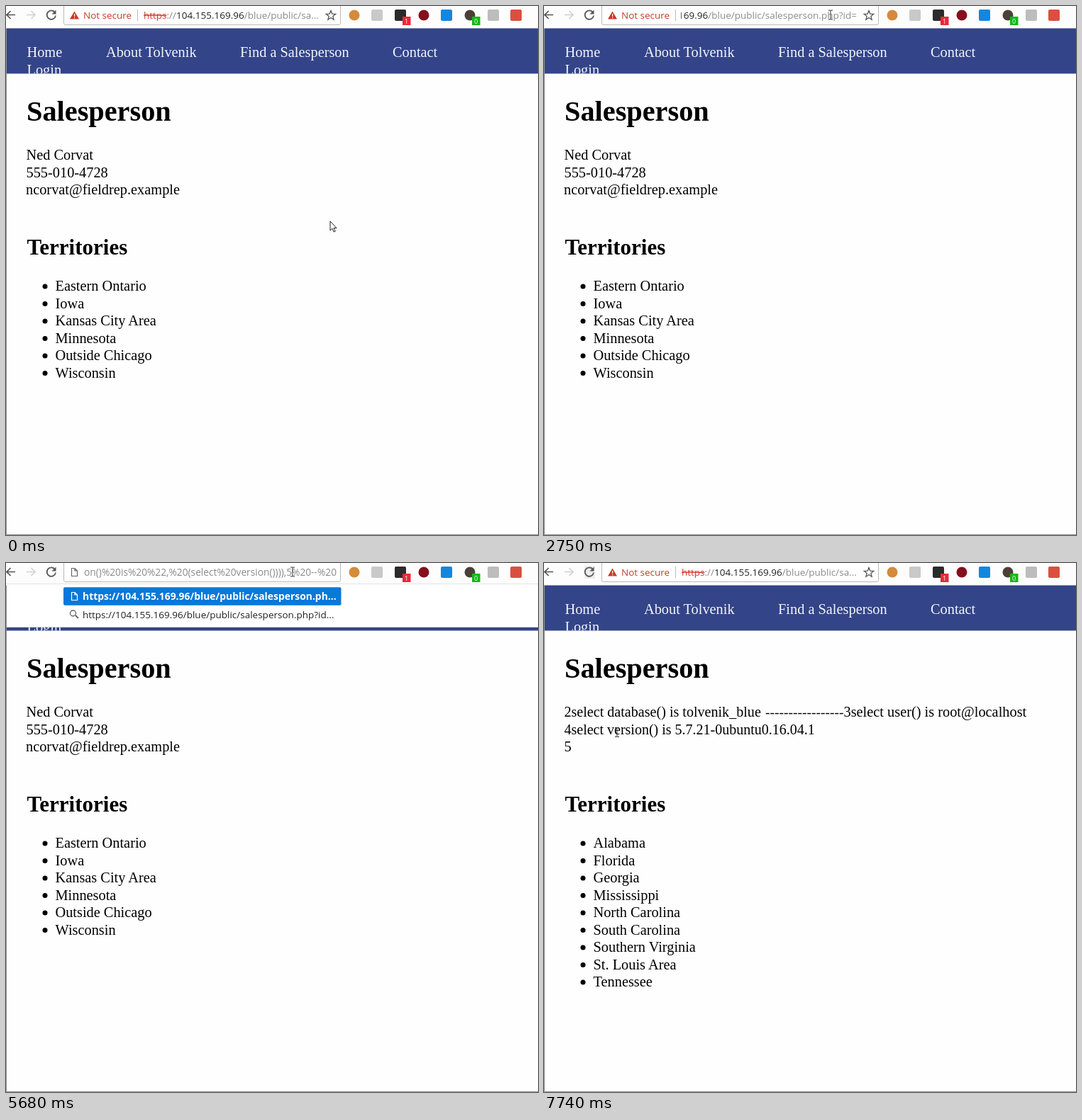
An HTML page that plays this animation: 750 px wide and 747 px high, repeating every 7.99 s.

```html
<!DOCTYPE html>
<html lang="en">
<head>
<meta charset="utf-8">
<title>Salesperson</title>
<style>
  html, body { margin: 0; width: 100%; height: 100%; overflow: hidden; background: #fff; }
  svg { display: block; width: 100vw; height: 100vh; }
  .page { font: 20.35px "Liberation Serif", serif; }
  .ui { font: 13.5px "Open Sans", "Noto Sans", sans-serif; }
  .bold { font-weight: bold; }
</style>
</head>
<body>
<svg id="stage" viewBox="0 0 750 747" xmlns="http://www.w3.org/2000/svg">
  <defs>
    <clipPath id="chipClip"><rect x="193" y="0" width="249" height="28"/></clipPath>
    <clipPath id="wideClip"><rect x="108" y="0" width="360" height="28"/></clipPath>
    <clipPath id="navClip"><rect x="0" y="31" width="750" height="64.5"/></clipPath>
  </defs>
  <g id="page" class="page"></g>
  <g id="bar" class="ui"></g>
  <g id="popup" class="ui"></g>
  <g id="cursor"></g>
</svg>
<script>
const LOOP = 7990;
const HOST = '104.155.169.96', DIR = '/blue/public/';
const SCRIPT = DIR + 'salesperson.php?id=';
const INJECTED = 'on()%20is%20%22,%20(select%20version()))),5%20--%20';

const layers = {};
function put(id, markup) {
  if (layers[id] === markup) return;
  layers[id] = markup;
  document.getElementById(id).innerHTML = markup;
}

const text = (x, y, s, attrs = '') => `<text x="${x}" y="${y}" ${attrs}>${s}</text>`;
const rect = (x, y, w, h, fill, attrs = '') =>
  `<rect x="${x}" y="${y}" width="${w}" height="${h}" fill="${fill}" ${attrs}/>`;
const line = (d, stroke, width = 1) =>
  `<path d="${d}" fill="none" stroke="${stroke}" stroke-width="${width}"/>`;
const span = (s, fill, attrs = '') => `<tspan fill="${fill}" ${attrs}>${s}</tspan>`;

// Last entry whose start time has passed
const latest = (steps, t) => steps.filter(s => s[0] <= t).pop();

/* Web page */

const people = {
  before: {
    lines: [[28.5, 217, 'Ned Corvat'], [28.5, 241.5, '555-010-4728'], [28, 266, 'ncorvat@fieldrep.example']],
    areas: ['Eastern Ontario', 'Iowa', 'Kansas City Area', 'Minnesota', 'Outside Chicago', 'Wisconsin']
  },
  after: {
    lines: [
      [28.5, 217, '2select database() is tolvenik_blue', 'font-size="20.1"'],
      [312, 217, '-'.repeat(17), 'font-size="19.5"'],
      [422.5, 217, '3select user() is root@localhost'],
      [28.5, 241.5, '4select version() is 5.7.21-0ubuntu0.16.04.1', 'font-size="20"'],
      [28.5, 266, '5']
    ],
    areas: ['Alabama', 'Florida', 'Georgia', 'Mississippi', 'North Carolina', 'South Carolina',
      'Southern Virginia', 'St. Louis Area', 'Tennessee']
  }
};

function drawPage(t) {
  const { lines, areas } = t < 7050 ? people.before : people.after;
  const nav = [[29.5, 72, 'Home'], [141, 72, 'About Tolvenik'], [330, 72, 'Find a Salesperson'],
    [545, 72, 'Contact'], [29.5, 96.5, 'Login']];
  put('page',
    rect(0, 0, 750, 747, '#fefefe') +
    rect(0, 31, 750, 64.5, '#334488') +
    `<g fill="#f3f4fa" clip-path="url(#navClip)">${nav.map(n => text(...n)).join('')}</g>` +
    text(29, 161.5, 'Salesperson', 'class="bold" font-size="40.3"') +
    lines.map(l => text(...l)).join('') +
    text(29.5, 350.5, 'Territories', 'class="bold" font-size="31"') +
    areas.map((a, i) => {
      const y = 402 + i * 24.5;
      return `<circle cx="55" cy="${y - 6}" r="3.5"/>` + text(69.5, y, a);
    }).join('') +
    line('M.5 31V746.5H750', '#8f8f8f'));
}

/* Browser toolbar */

const docIcon = (y, color) =>
  line(`M92.5 ${y - 5.5}h4.5l3.5 3.5v7.5h-8zM97 ${y - 5.5}v3.5h3.5`, color, 1.2);
const searchIcon = y => line(`M98 ${y + 1.5}l4 4`, '#666', 1.8) +
  `<circle cx="94.5" cy="${y - 1.5}" r="4" fill="none" stroke="#666" stroke-width="1.4"/>`;
const badge = (x, s, color) => rect(x, 15, 11.5, 12, color) +
  text(x + 5.7, 24.5, s, 'font-size="9" fill="#fff" text-anchor="middle"');

function star(cx, cy) {
  const pts = Array.from({ length: 10 }, (_, i) => {
    const r = i % 2 ? 3 : 7, a = i * Math.PI / 5;
    return (cx + r * Math.sin(a)).toFixed(1) + ',' + (cy - r * Math.cos(a)).toFixed(1);
  });
  return `<polygon points="${pts.join(' ')}" fill="none" stroke="#555" stroke-width="1.3"/>`;
}

function buttons(t) {
  const loading = t >= 5950 && t < 7050;
  return line('M13 12.5H1M6.5 7L1 12.5L6.5 18', '#555', 1.7) +
    line('M29 12.5H41M35.5 7L41 12.5L35.5 18', '#d2d2d2', 1.7) +
    (t >= 7200 ? rect(57, 4, 15, 18, '#ededed') : '') +
    (loading
      ? line('M58.5 7L69.5 18M69.5 7L58.5 18', '#555', 1.8)
      : line('M69 9.2A6.2 6.2 0 1 0 70 13.5', '#555', 1.8) +
        '<path d="M70.5 5.5v6h-6z" fill="#555"/>');
}

function extensions(t) {
  const tile = (cx, fill) => rect(cx - 8, 5, 16, 16, fill, 'rx="2"');
  const dot = (cx, fill) => `<circle cx="${cx}" cy="13" r="7.5" fill="${fill}"/>`;
  const badges = t >= 6260 && t < 6400 ? '' : badge(559, '1', '#e8283a') + badge(657, '0', '#12b812');
  return dot(491, '#d58a3c') + tile(523, '#c9c9c9') + tile(556, '#2b2b2b') + dot(589, '#850f1c') +
    tile(621, '#1287e0') + dot(654, '#4a4038') + tile(687, '#bdbdbd') + tile(719, '#d9503f') + badges;
}

function securityChip(opacity = 1) {
  return `<g opacity="${opacity}" fill="#c53929">` +
    '<path d="M96.5 7.5L103 18.5H90z"/>' +
    rect(96, 11, 1.2, 4, '#fff') + rect(96, 16, 1.2, 1.3, '#fff') +
    text(109, 18, 'Not secure') + rect(185, 5, 1, 16, '#bbb') + '</g>';
}

function url(x, path, { scheme = '#999', strike = false, plain = '', attrs = '' } = {}) {
  return text(x, 18,
    span('https', plain || scheme, strike ? 'text-decoration="line-through"' : '') +
    span('://', plain || '#888') + span(HOST, plain || '#222') + span(path, plain || '#8a8a8a'), attrs);
}
const clipped = (id, s) => `<g clip-path="url(#${id})">${s}</g>`;
const caret = x => rect(x, 3, 1, 19, '#333');

function address(t) {
  const red = { scheme: '#d0402f', strike: true };
  if (t < 1240) return securityChip() + url(194, DIR + 'sa...', red);
  if (t < 1360) {
    return securityChip() + rect(194, 3, 247.5, 19, '#0078d7') +
      clipped('chipClip', url(194, DIR + 'sale', { plain: '#fff', strike: true }));
  }
  if (t < 1820) {
    return securityChip() + url(194, DIR + 'sale', red) + (t >= 1670 ? caret(417) : '');
  }
  if (t < 3330) {
    const [, x, digits] = latest([[1820, 500, '10'], [1950, 441, '10'], [2100, 441, '1'], [2220, 441, '']], t);
    return securityChip() +
      clipped('chipClip', url(x, SCRIPT + digits, { ...red, attrs: 'text-anchor="end"' })) +
      (t >= 1950 && t < 2750 ? caret(441) : '');
  }
  if (t < 4660) {
    return docIcon(13, '#666') + url(109, SCRIPT) + (t < 3860 || t >= 4390 ? caret(460) : '');
  }
  if (t < 5950) {
    return docIcon(13, '#666') +
      clipped('wideClip', text(466, 18, INJECTED, 'text-anchor="end" font-size="13.75" fill="#8a8a8a"')) +
      (t < 5680 ? caret(466) : '');
  }
  if (t < 6260) return docIcon(13, '#666') + url(109, DIR + 'salesperson....');
  return securityChip(t < 6400 ? 0.5 : 1) + url(194, DIR + 'sa...', red);
}

function drawBar(t) {
  const open = t >= 3330 && t < 5950;
  put('bar',
    rect(0, 0, 750, 31.5, '#fdfdfd') +
    rect(81.5, -3.5, 390, 30, '#fff', 'stroke="#b9b9b9" rx="2"') +
    buttons(t) + address(t) + (open ? '' : star(458, 13.5)) + extensions(t));
}

/* Suggestions below the address */

function drawPopup(t) {
  if (t < 3330 || t >= 5950) return put('popup', '');
  const many = t < 4660;
  const [, dy] = latest([[0, 0], [4660, -1.5], [4780, -0.5], [5030, -1], [5150, 0]], t);
  const rows = many ? 6 : 2;
  const bottom = many ? 193 : 91 + dy / 2;
  let s = rect(1, 29, 749, bottom - 29, '#fff') +
    rect(0, 29, 750, 1, '#e2e2e2') + rect(1, bottom - 1, 749, 1, '#dedede') +
    rect(81, 34.25 + dy, 391.5, 25.5, '#0a78d8', 'rx="2"');
  for (let i = 0; i < rows; i++) {
    const y = 47 + i * 25.5 + dy;
    if (i === rows - 1) {
      const query = many ? SCRIPT : SCRIPT.slice(0, -1) + '...';
      s += searchIcon(y) + text(108, y + 5, 'https://' + HOST + query, 'fill="#222"');
    } else {
      s += docIcon(y, i ? '#777' : '#fff') +
        text(108, y + 5, 'https://' + HOST + DIR + 'salesperson.ph...',
          `class="bold" font-size="13.9" fill="${i ? '#1c50c8' : '#fff'}"`);
    }
  }
  put('popup', s);
}

/* Mouse pointer */

const ARROW = 'M0 0V13L3 10.2L5.2 15L7.2 14.1L5.1 9.5H9z';
const BEAM = 'M-3 -6.5h2q1 0 1 1q0 -1 1 -1h2M0 -5.5v11M-3 6.5h2q1 0 1 -1q0 1 1 1h2';
const moves = [
  [0, 457, 304, ARROW], [250, 442, 280, ARROW], [400, 371, 117, ARROW],
  [550, 404, 6, BEAM], [700, 404, 7, BEAM], [850, 400, 9, BEAM], [980, 408, 17, BEAM],
  [1100, 405, 18, BEAM], [1240, 404, 14, BEAM], [1670, 404, 12.5, BEAM],
  [7200, 390, 24, ARROW], [7320, 350, 80, ARROW], [7440, 280, 169, ARROW],
  [7590, 209, 211.5, BEAM], [7740, 103, 239, BEAM]
];

function drawCursor(t) {
  const [, x, y, shape] = latest(moves, t);
  const style = shape === ARROW ? 'fill="#fff" stroke="#222"' : 'fill="none" stroke="#333"';
  put('cursor', `<path d="${shape}" transform="translate(${x} ${y})" ${style}/>`);
}

function draw(t) {
  drawPage(t);
  drawBar(t);
  drawPopup(t);
  drawCursor(t);
}

const start = performance.now();
function tick() {
  draw((performance.now() - start) % LOOP);
  requestAnimationFrame(tick);
}
tick();
</script>
</body>
</html>
```
